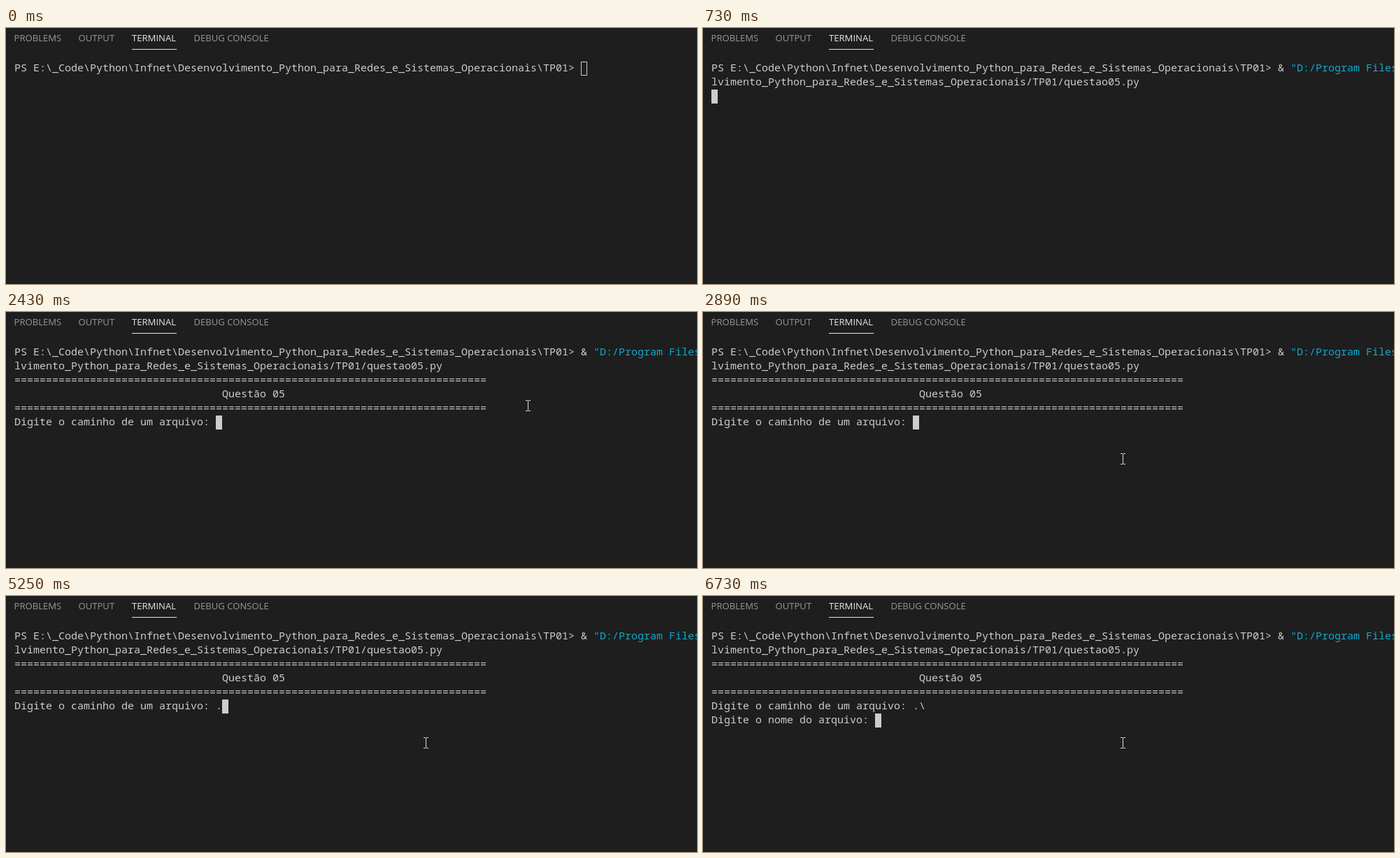
Animation of 988 by 366 pixels, one loop 8 s. Source, as an HTML page with a canvas:

```html
<!DOCTYPE html>
<html lang="pt">
<head>
<meta charset="utf-8">
<title>Terminal</title>
<style>
  html, body { margin: 0; width: 988px; height: 366px; overflow: hidden; background: #1e1e1e; }
  canvas { display: block; }
</style>
</head>
<body>
<canvas id="stage" width="988" height="366"></canvas>
<script>
const ctx = document.getElementById('stage').getContext('2d', { alpha: false });
const LOOP = 8000, LEFT = 12, TOP = 48, CELL = 9, ROW = 20;
const FG = '#cccccc', CYAN = '#11a8cd', BRIGHT = '#e7e7e7', DIM = '#979797';

const PROMPT = 'PS E:\\_Code\\Python\\Infnet\\Desenvolvimento_Python_para_Redes_e_Sistemas_Operacionais\\TP01> ';
const SCRIPT = 'lvimento_Python_para_Redes_e_Sistemas_Operacionais/TP01/questao05.py';
const ASK_PATH = 'Digite o caminho de um arquivo: ';
const ASK_NAME = 'Digite o nome do arquivo: ';
const RULE = '='.repeat(75);

// Each entry: start time, cursor column, cursor row
const CURSOR = [
  [0, PROMPT.length, 0], [650, SCRIPT.length, 1], [730, 0, 2], [1270, 0, 3],
  [1350, 32, 5], [5250, 33, 5], [5800, 34, 5], [6660, 0, 6], [6730, ASK_NAME.length, 6]
];

// Pointer positions, held one step each
const POINTER_START = 2430, POINTER_STEP = 460 / 6;
const POINTER = [[746, 134], [722, 190], [676, 260], [630, 286], [594, 264], [591, 230], [600, 210]];

function box(x, y, w, h, color = FG) {
  ctx.fillStyle = color;
  ctx.fillRect(x, y, w, h);
}

function write(text, col, row, color = FG) {
  ctx.fillStyle = color;
  ctx.fillText(text, LEFT + col * CELL, TOP + row * ROW + 14);
}

function drawTabs() {
  ctx.font = '13.1px "Open Sans", sans-serif';
  const tab = (label, x, color) => {
    ctx.fillStyle = color;
    ctx.fillText(label, x, 19);
  };
  tab('PROBLEMS', 11.5, DIM);
  tab('OUTPUT', 103.5, DIM);
  tab('TERMINAL', 180, BRIGHT);
  tab('DEBUG CONSOLE', 268.5, DIM);
  box(180, 30, 64, 1, BRIGHT);
}

function drawText(t) {
  ctx.font = '15px "Noto Sans Mono", monospace';
  write(PROMPT, 0, 0);
  if (t >= 650) {
    write('&', 90, 0);
    write('"D:/Program Files', 92, 0, CYAN);
    write(SCRIPT, 0, 1);
  }
  if (t >= 1270) write(RULE, 0, 2);
  if (t >= 1350) {
    write('Questão 05', 33, 3);
    write(RULE, 0, 4);
    const typed = t >= 5800 ? '.\\' : t >= 5250 ? '.' : '';
    write(ASK_PATH + typed, 0, 5);
  }
  if (t >= 6730) write(ASK_NAME, 0, 6);
}

function drawCursor(t) {
  const [, col, row] = CURSOR.findLast(([start]) => t >= start);
  const x = LEFT + col * CELL, y = TOP + row * ROW;
  box(x, y, CELL, ROW);
  if (t < 500) box(x + 1, y + 1, CELL - 2, ROW - 2, '#1e1e1e');
}

function drawPointer(t) {
  if (t < POINTER_START) return;
  const step = Math.floor((t - POINTER_START) / POINTER_STEP + 0.05);
  const [x, y] = POINTER[Math.min(step, POINTER.length - 1)];
  if (t >= 3120 && t < 3200) {
    ctx.fillStyle = 'rgba(255, 255, 0, 0.47)';
    ctx.beginPath();
    ctx.arc(598, 209, 15, 0, Math.PI * 2);
    ctx.fill();
  }
  for (const edge of [y - 8, y + 7]) {
    box(x - 3, edge, 3, 1, '#e1e1e1');
    box(x + 1, edge, 3, 1, '#e1e1e1');
  }
  box(x, y - 7, 1, 14, '#e1e1e1');
}

function draw(now) {
  const t = now % LOOP;
  box(0, 0, 988, 366, '#1e1e1e');
  drawTabs();
  drawText(t);
  drawCursor(t);
  drawPointer(t);
}

function tick() {
  draw(performance.now());
  requestAnimationFrame(tick);
}
tick();
</script>
</body>
</html>
```
